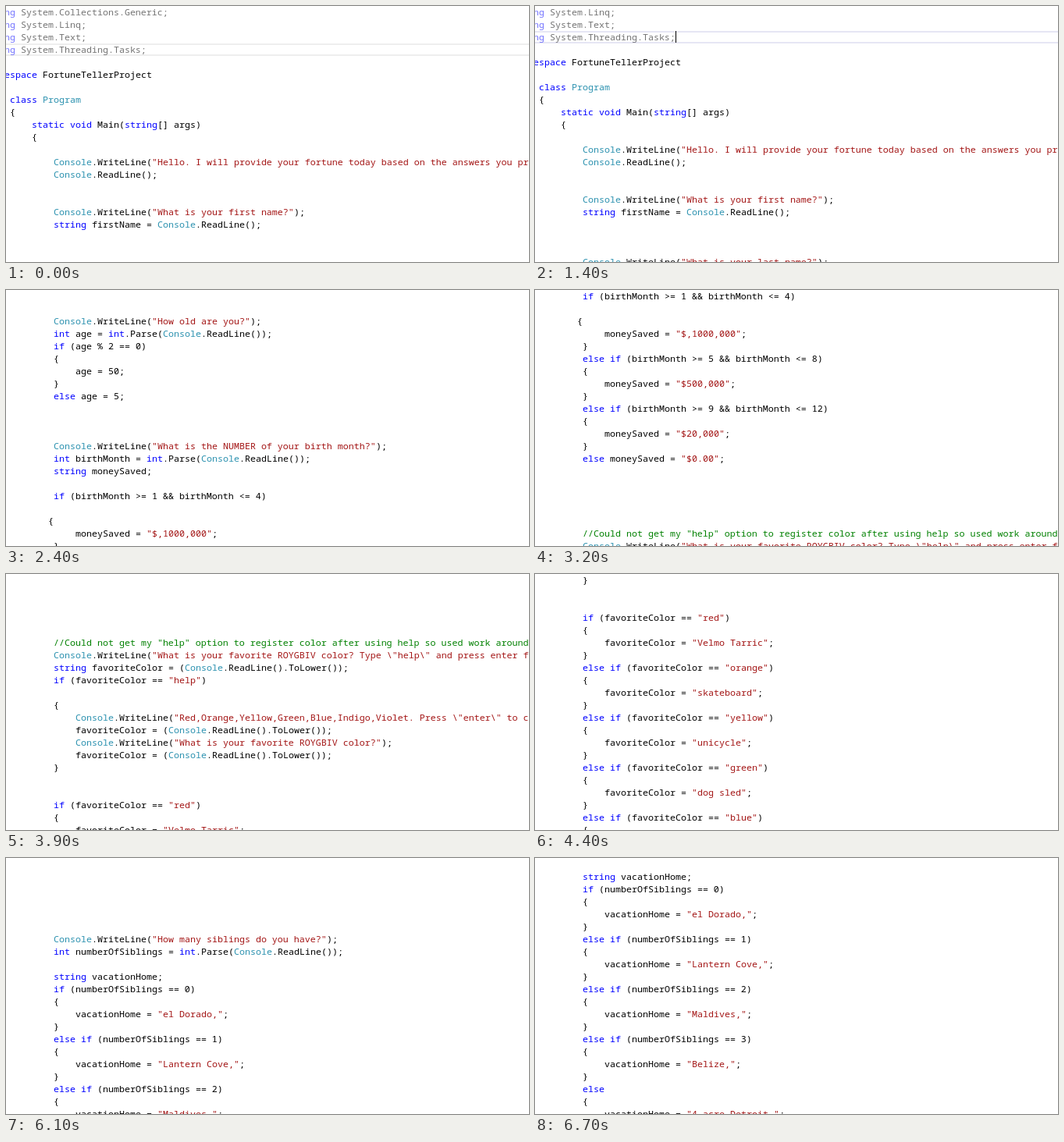
Write an HTML page with a canvas that moves like this. It is 670 by 328 pixels and loops after 8 s.

```html
<!DOCTYPE html>
<html lang="en">
<head>
<meta charset="utf-8">
<title>Code scroll</title>
<style>
  html, body { margin: 0; width: 670px; height: 328px; overflow: hidden; background: #fff; }
  canvas { display: block; }
</style>
</head>
<body>
<canvas id="stage" width="670" height="328"></canvas>
<script>
const ctx = document.getElementById('stage').getContext('2d');
const LOOP = 8000, ROW = 16, COL = 7, LEFT = -23, CARET_LINE = 3;

const gap = n => Array(n).fill('');
const body = text => text.trim().split('\n').map(s => s && ' '.repeat(12) + s);

// if / else-if / else ladder that assigns one variable
function ladder(test, target, cases) {
  return cases.flatMap(([key, value], i) => {
    const head = key === null ? 'else' : `${i ? 'else ' : ''}if (${test} == ${key})`;
    return body(`${head}\n{\n    ${target} = "${value}";\n}`);
  });
}

const lines = [
  'using System.Collections.Generic;',
  'using System.Linq;',
  'using System.Text;',
  'using System.Threading.Tasks;',
  '',
  'namespace FortuneTellerProject',
  '{',
  '    class Program',
  '    {',
  '        static void Main(string[] args)',
  '        {',
  '',
  ...body(`
Console.WriteLine("Hello. I will provide your fortune today based on the answers you provide.");
Console.ReadLine();


Console.WriteLine("What is your first name?");
string firstName = Console.ReadLine();



Console.WriteLine("What is your last name?");
string lastName = Console.ReadLine();`),
  ...gap(6),
  ...body(`
Console.WriteLine("How old are you?");
int age = int.Parse(Console.ReadLine());
if (age % 2 == 0)
{
    age = 50;
}
else age = 5;



Console.WriteLine("What is the NUMBER of your birth month?");
int birthMonth = int.Parse(Console.ReadLine());
string moneySaved;

if (birthMonth >= 1 && birthMonth <= 4)`),
  '',
  ' '.repeat(11) + '{',
  ...body(`
    moneySaved = "$,1000,000";
}
else if (birthMonth >= 5 && birthMonth <= 8)
{
    moneySaved = "$500,000";
}
else if (birthMonth >= 9 && birthMonth <= 12)
{
    moneySaved = "$20,000";
}
else moneySaved = "$0.00";`).map((s, i) => i ? s : '    ' + s),
  ...gap(5),
  ...body(String.raw`
//Could not get my "help" option to register color after using help so used work around
Console.WriteLine("What is your favorite ROYGBIV color? Type \"help\" and press enter for a list.");
string favoriteColor = (Console.ReadLine().ToLower());
if (favoriteColor == "help")

{
    Console.WriteLine("Red,Orange,Yellow,Green,Blue,Indigo,Violet. Press \"enter\" to continue.");
    favoriteColor = (Console.ReadLine().ToLower());
    Console.WriteLine("What is your favorite ROYGBIV color?");
    favoriteColor = (Console.ReadLine().ToLower());
}`),
  ...gap(2),
  ...ladder('favoriteColor', 'favoriteColor', [
    ['"red"', 'Velmo Tarric'],
    ['"orange"', 'skateboard'],
    ['"yellow"', 'unicycle'],
    ['"green"', 'dog sled'],
    ['"blue"', 'Melon Wagon'],
    ['"Indigo"', 'dolphin with a saddle'],
    [null, 'hot air balloon']
  ]),
  ...gap(9),
  ...body(`
Console.WriteLine("How many siblings do you have?");
int numberOfSiblings = int.Parse(Console.ReadLine());

string vacationHome;`),
  ...ladder('numberOfSiblings', 'vacationHome', [
    [0, 'el Dorado,'],
    [1, 'Lantern Cove,'],
    [2, 'Maldives,'],
    [3, 'Belize,'],
    [null, '4 acre Detroit,']
  ])
];

const TOKEN = /(\/\/.*)|("(?:\\.|[^"\\])*")|\b(using|namespace|class|static|void|string|int|if|else)\b|\b(Console|Program)\b/g;
const COLORS = ['#008000', '#a31515', '#0000ff', '#2b91af'];

// Split a line into coloured runs: [column, text, colour]
function tokenize(line) {
  const runs = [];
  let at = 0;
  const plain = end => {
    const text = line.slice(at, end);
    const pad = text.length - text.trimStart().length;
    if (text.trim()) runs.push([at + pad, text.trim(), '#000']);
  };
  for (const m of line.matchAll(TOKEN)) {
    plain(m.index);
    runs.push([m.index, m[0], COLORS[m.slice(1).findIndex(Boolean)]]);
    at = m.index + m[0].length;
  }
  plain(line.length);
  return runs;
}
const tokens = lines.map(tokenize);

// Wheel bursts: start time, then the top line at each 100 ms step
const bursts = [
  [0, 0],
  [1400, 1, 4, 7, 10, 13, 16, 18, 19, 22, 25, 27],
  [2700, 28, 31, 34, 37, 40, 43, 46, 50, 53, 54],
  [3900, 57, 60, 63, 66, 69, 72, 75],
  [4900, 76, 79, 82, 85, 88, 91, 94, 97, 99],
  [5900, 100, 103, 106, 108, 109, 111],
  [6600, 112, 114]
];

function topLine(t) {
  const [start, ...tops] = bursts.filter(b => b[0] <= t).pop();
  return tops[Math.min(tops.length - 1, Math.floor((t - start) / 100))];
}

function drawCurrentLine(top) {
  const y = (CARET_LINE - top) * ROW;
  const active = top > 0;
  ctx.fillStyle = active ? '#e6e6f4' : '#eeeeee';
  ctx.fillRect(0, y, 670, 2);
  ctx.fillRect(0, y + 14, 670, 2);
  if (active) {
    ctx.fillStyle = '#000';
    ctx.fillRect(LEFT + lines[CARET_LINE].length * COL, y, 1, 15);
  }
}

function draw(t) {
  const top = topLine(t);
  ctx.fillStyle = '#fff';
  ctx.fillRect(0, 0, 670, 328);
  if (top <= CARET_LINE) drawCurrentLine(top);
  ctx.font = '11.667px "Noto Sans Mono", "DejaVu Sans Mono", monospace';
  ctx.textBaseline = 'alphabetic';
  for (let i = top; i < Math.min(top + 21, lines.length); i++) {
    ctx.globalAlpha = i <= CARET_LINE ? 0.55 : 1;
    for (const [col, text, color] of tokens[i]) {
      ctx.fillStyle = color;
      ctx.fillText(text, LEFT + col * COL, (i - top) * ROW + 12);
    }
  }
  ctx.globalAlpha = 1;
}

const begin = performance.now();
function tick() {
  draw((performance.now() - begin) % LOOP);
  requestAnimationFrame(tick);
}
tick();
</script>
</body>
</html>
```
